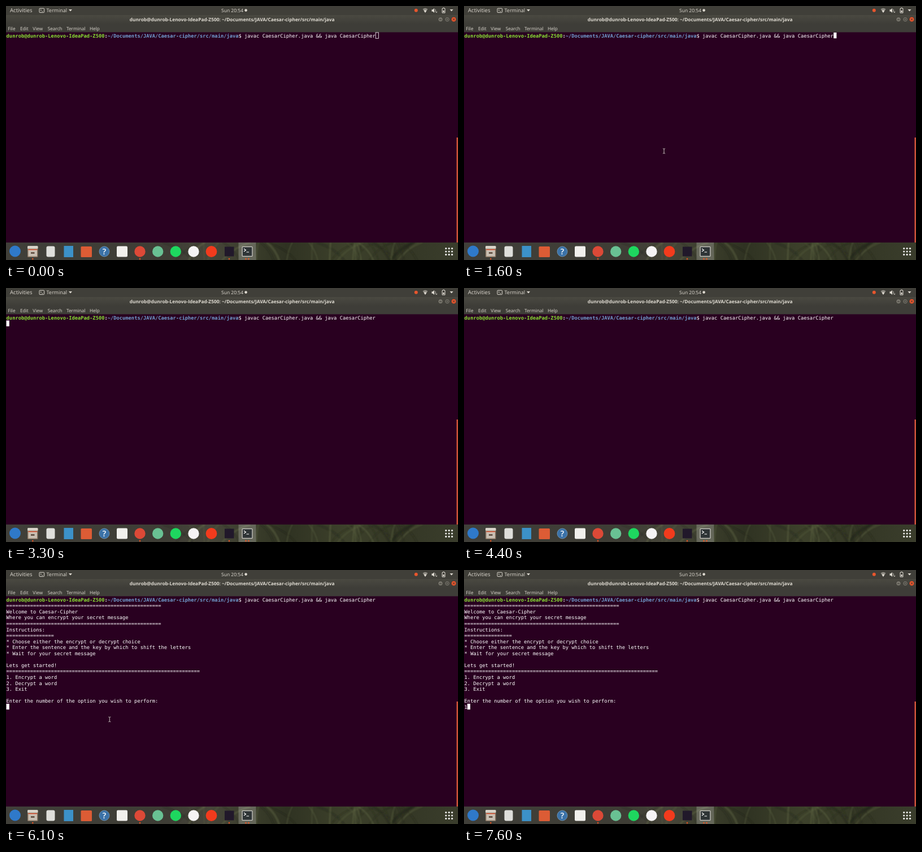
These frames come from a looping animation (800x450 px, 8 s). An HTML page:

```html
<!DOCTYPE html>
<html lang="en">
<head>
<meta charset="utf-8">
<title>Terminal session</title>
<style>
html, body { margin: 0; width: 100%; height: 100%; overflow: hidden; background: #290020; }
svg { display: block; width: 800px; height: 450px; }
text { white-space: pre; text-rendering: geometricPrecision; fill: #dfdbd2; font: 8.25px "Open Sans", "Noto Sans", sans-serif; }
.panel text { font-size: 9px; }
text.title { font-size: 8.33px; font-weight: 700; text-anchor: middle; }
.term text { font: 8.755px "DejaVu Sans Mono", monospace; fill: #fff; }
.term .user { fill: #8ae234; font-weight: 700; }
.term .path { fill: #729fcf; font-weight: 700; }
.term .sep { font-weight: 700; }
</style>
</head>
<body>
<svg viewBox="0 0 800 450">
  <defs>
    <linearGradient id="bar" x2="0" y2="1">
      <stop stop-color="#4a4941"/><stop offset="1" stop-color="#3e3d38"/>
    </linearGradient>
    <linearGradient id="dock">
      <stop stop-color="#403f39"/><stop offset=".36" stop-color="#3e3d35"/>
      <stop offset=".45" stop-color="#47463a"/><stop offset=".56" stop-color="#383b29"/>
      <stop offset=".62" stop-color="#2f3222"/><stop offset=".75" stop-color="#3d412b"/>
      <stop offset=".88" stop-color="#343725"/><stop offset="1" stop-color="#3a3d2c"/>
    </linearGradient>
    <filter id="soft" x="-10%" y="-50%" width="120%" height="200%"><feGaussianBlur stdDeviation="1"/></filter>
    <clipPath id="dockClip"><path d="M0 419h800v31H0z"/></clipPath>
  </defs>

  <rect width="800" height="450" fill="#290020"/>
  <rect width="800" height="16" fill="#403f39"/>
  <rect y="16" width="800" height="16" fill="url(#bar)"/>
  <rect y="32" width="800" height="14.5" fill="#3e3d38"/>

  <g class="panel" fill="#dfdbd2">
    <text x="7" y="11" style="font-size:9.6px">Activities</text>
    <text x="71.5" y="11">Terminal</text>
    <text x="381" y="11" style="font-size:8.5px">Sun 20:54</text>
    <rect x="59" y="4.2" width="8.6" height="7.4" rx="1" fill="none" stroke="#dfdbd2"/>
    <path d="M61 6l1.6 1.4L61 8.8M63.4 9.5h2.2" fill="none" stroke="#dfdbd2" stroke-width=".8"/>
    <path d="M111 6h6l-3 3.5zM785.5 6h6l-3 3.5z"/>
    <circle cx="424.6" cy="7.6" r="2.3"/>
    <circle cx="725.8" cy="7.8" r="3" fill="#e8562d"/>
    <path d="M737.5 5.5q4.5-3.5 9 0L742 12z" opacity=".5"/>
    <path d="M739.6 8.3q2.4-1.7 4.8 0L742 12z"/>
    <path d="M753.5 6.3h2l2.500-2.300v8l-2.500-2.300h-2z"/>
    <path d="M759.5 5.500q2 2.300 0 4.800M760.500 9.500l2.500 2.500m0-2.500l-2.500 2.500" fill="none" stroke="#dfdbd2" stroke-width=".8"/>
    <path d="M772 4.500h1.300V3.300h2.400v1.200h1.300v7.700h-5z" fill="none" stroke="#dfdbd2"/>
    <rect x="773.3" y="8" width="2.4" height="3"/>
  </g>

  <text class="title" id="title" x="400.2" y="27"/>
  <g stroke="#34332e" stroke-width=".7">
    <circle cx="769" cy="23.7" r="4.2" fill="#77756c"/>
    <circle cx="781" cy="23.7" r="4.2" fill="#77756c"/>
    <circle cx="792.5" cy="23.7" r="4.4" fill="#e8562d"/>
    <path d="M767 24h4M779.3 22h3.4v3.4h-3.4zM790.800 22l3.400 3.400m0-3.400l-3.400 3.400" fill="none" stroke-width=".9"/>
  </g>
  <g id="menu"></g>

  <g class="term" id="term"></g>
  <rect id="caret" width="5.2" height="10.3"/>
  <rect x="797.4" y="233" width="2.6" height="186" fill="#cb5339"/>

  <g clip-path="url(#dockClip)">
    <rect y="419" width="800" height="31" fill="url(#dock)"/>
    <g id="grass" fill="none" filter="url(#soft)"></g>
  </g>
  <g id="icons">
    <rect x="411.5" y="419" width="31" height="31" fill="#fff" opacity=".22"/>
    <circle cx="16" cy="434.5" r="10" fill="#2f79c9"/>
    <g>
      <rect x="38" y="425" width="18.5" height="20" rx="1.5" fill="#8a7663"/>
      <rect x="38" y="425" width="18.5" height="5" rx="1.5" fill="#d8d2c8"/>
      <rect x="39.5" y="431" width="15.5" height="12.5" fill="#c9bfb3"/>
      <path d="M39.5 431.7h15.5" stroke="#e0583a" stroke-width="1.5"/>
      <rect x="44" y="436" width="6.5" height="3" fill="#665548"/>
    </g>
    <rect x="71.5" y="425.5" width="15" height="19" rx="3" fill="#dededa"/>
    <rect x="102.5" y="425" width="16.5" height="20" fill="#3c91c8"/>
    <rect x="132.5" y="426" width="19.5" height="19" rx="1.5" fill="#dc5c35"/>
    <circle cx="174" cy="435" r="9" fill="#3b72a8" stroke="#7fa5c7" stroke-width=".7"/>
    <text x="174" y="440" text-anchor="middle" style="font-size:14px;font-weight:600;fill:#fff">?</text>
    <rect x="196" y="425.5" width="19" height="19" rx="2" fill="#f1f0ec"/>
    <circle cx="237" cy="435" r="9.7" fill="#dc4937"/>
    <circle cx="268.7" cy="435" r="9.7" fill="#69c193"/>
    <circle cx="300.3" cy="435" r="9.7" fill="#1ed75f"/>
    <circle cx="332" cy="435" r="9.7" fill="#f5f3f4"/>
    <circle cx="363.5" cy="435" r="9.9" fill="#f23b1d"/>
    <rect x="387" y="426.5" width="16.5" height="17" fill="#21182a"/>
    <rect x="417.5" y="426" width="19" height="18" rx="1.5" fill="#d3d1cb"/>
    <rect x="418.7" y="427.2" width="16.6" height="15.6" fill="#2e3436"/>
    <path d="M421 430l3.500 2.500-3.500 2.500M425.500 436h4.500" fill="none" stroke="#fff" stroke-width="1.2"/>
  </g>

  <path id="beam" fill="none" stroke="#d9d6ce" stroke-width=".9" d="M-2-4.300q2 0 2 1V3.300q0 1 2 1M2-4.300q-2 0-2 1M0 3.300q0 1-2 1"/>
  <path id="arrow" fill="#111" stroke="#fff" stroke-width=".8" d="M0 0v8.500l2-1.800 1.300 3 1.400-.6-1.300-2.900h2.600z"/>
</svg>
<script>
const $ = id => document.getElementById(id);
const CELL = 5.2706, ROW = 10.55, LEFT = .6, TOP = 47;

function add(parent, tag, attrs, text = "") {
  const el = document.createElementNS("http://www.w3.org/2000/svg", tag);
  for (const k in attrs) el.setAttribute(k, attrs[k]);
  el.textContent = text;
  return parent.appendChild(el);
}

const host = "dunrob@dunrob-Lenovo-IdeaPad-Z500";
const path = "~/Documents/JAVA/Caesar-cipher/src/main/java";
const command = "javac CaesarCipher.java && java CaesarCipher";
const rule = n => "=".repeat(n);
const output = [
  rule(52),
  "Welcome to Caesar-Cipher",
  "Where you can encrypt your secret message",
  rule(52),
  "Instructions:",
  rule(16),
  "* Choose either the encrypt or decrypt choice",
  "* Enter the sentence and the key by which to shift the letters",
  "* Wait for your secret message",
  "",
  "Lets get started!",
  rule(65),
  "1. Encrypt a word",
  "2. Decrypt a word",
  "3. Exit",
  "",
  "Enter the number of the option you wish to perform:"
];
const INPUT_ROW = output.length + 1;
const promptEnd = host.length + path.length + 3 + command.length;

$("title").textContent = `${host}: ${path}`;
[["File", 3.5], ["Edit", 25], ["View", 47.3], ["Search", 73.7], ["Terminal", 107], ["Help", 148]]
  .forEach(([label, x]) => add($("menu"), "text", { x, y: 42.8 }, label));

const line = (parent, row, text = "") =>
  add(parent, "text", { x: LEFT, y: TOP + row * ROW + 8.8 }, text);
const prompt = line($("term"), 0);
[["user", host], ["sep", ":"], ["path", path], ["", "$ " + command]]
  .forEach(([cls, text]) => add(prompt, "tspan", { class: cls }, text));
const result = add($("term"), "g", {});
output.forEach((text, i) => line(result, i + 1, text));
const answer = line($("term"), INPUT_ROW, "1");

// Blurred blades of grass behind the dock
let seed = 7;
const random = () => (seed = seed * 16807 % 2147483647) / 2147483647;
for (let i = 0; i < 40; i++) {
  const x = 300 + random() * 430, lean = random() * 110 - 55;
  add($("grass"), "path", {
    d: `M${x} 453q${lean * .3}-22 ${lean}-34`,
    stroke: i % 2 ? "#68704a" : "#22261a",
    "stroke-width": 1 + random() * 3,
    opacity: .2 + random() * .35
  });
}

// Marks below open windows, and the application grid
[47.3, 237, 395, 424.5, 429.5].forEach(cx =>
  add($("icons"), "circle", { cx, cy: 448, r: 1.3, fill: "#e95420" }));
for (let i = 0; i < 9; i++)
  add($("icons"), "circle", { cx: 778.7 + i % 3 * 5.4, cy: 429.6 + (i / 3 | 0) * 5.4, r: 1.6, fill: "#eeeeec" });

// Pointer paths: [time, x, y]; the pointer is hidden before and after each
const moves = [
  { end: 3300, keys: [[1400, 338, 300], [1600, 354, 257], [2100, 490, 85], [2500, 545, 37], [2900, 552, 110]] },
  { end: 7500, keys: [[5700, 330, 330], [6300, 110, 232], [6900, 23, 206], [7300, 34, 203]] }
];

function pointerAt(t) {
  const move = moves.find(m => t >= m.keys[0][0] && t < m.end);
  if (!move) return null;
  const i = move.keys.findIndex(k => k[0] > t);
  if (i < 0) return move.keys.at(-1).slice(1);
  const [t0, x0, y0] = move.keys[i - 1], [t1, x1, y1] = move.keys[i];
  const u = (t - t0) / (t1 - t0);
  return [x0 + (x1 - x0) * u, y0 + (y1 - y0) * u];
}

function caretAt(t) {
  const blink = start => Math.floor((t - start) / 600) % 2 === 0;
  if (t < 3300) return { col: promptEnd, row: 0, on: t < 100 || blink(100) };
  if (t < 4500) return { col: 0, row: 1, on: blink(3300) };
  if (t < 7500) return { col: 0, row: INPUT_ROW, on: blink(4500) };
  return { col: 1, row: INPUT_ROW, on: true };
}

const show = (el, on) => el.setAttribute("visibility", on ? "visible" : "hidden");

function draw(now) {
  const t = Math.floor(now % 8000 / 100) * 100;
  show(result, t >= 4500);
  show(answer, t >= 7500);

  const { col, row, on } = caretAt(t), caret = $("caret"), focused = t >= 100;
  show(caret, on);
  caret.setAttribute("x", LEFT + col * CELL);
  caret.setAttribute("y", TOP + row * ROW);
  caret.setAttribute("fill", focused ? "#fff" : "none");
  caret.setAttribute("stroke", focused ? "none" : "#fff");
  caret.setAttribute("stroke-width", .8);

  const p = pointerAt(t), inTerm = p && p[1] > 46;
  show($("beam"), p && inTerm);
  show($("arrow"), p && !inTerm);
  if (p) for (const id of ["beam", "arrow"])
    $(id).setAttribute("transform", `translate(${p})`);
}

const start = performance.now();
function tick() {
  draw(performance.now() - start);
  requestAnimationFrame(tick);
}
tick();
</script>
</body>
</html>
```
